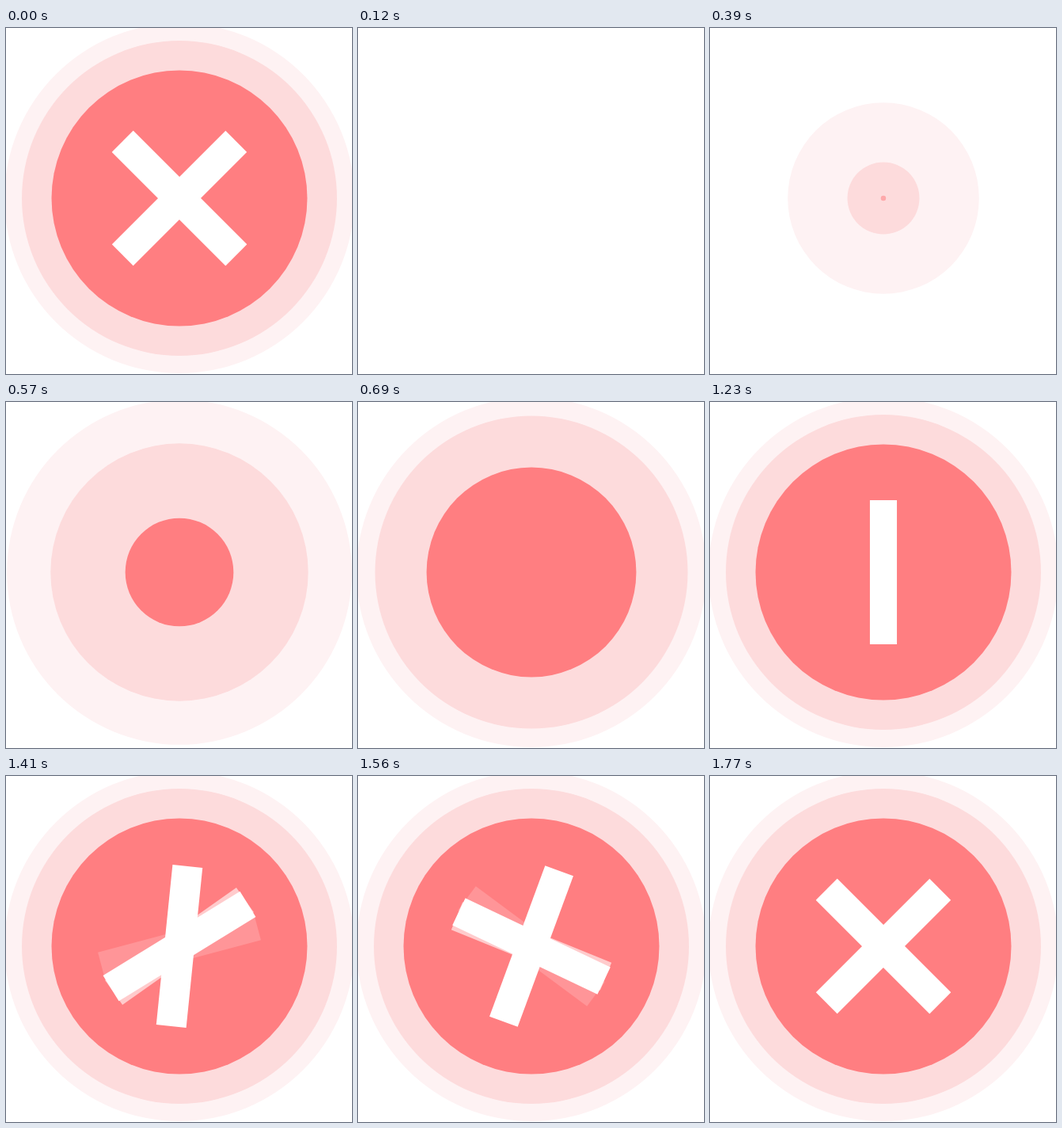
Recreate the animation shown at these times as an HTML page with a canvas. Size 437 by 437 pixels, loop 2250 ms.

```html
<!DOCTYPE html>
<html lang="en">
<head>
<meta charset="utf-8">
<title>Error badge</title>
<style>
  html, body { margin: 0; width: 100%; height: 100%; overflow: hidden; background: #fff; }
  canvas { display: block; }
</style>
</head>
<body>
<canvas id="stage" width="437" height="437"></canvas>
<script>
const ctx = document.getElementById('stage').getContext('2d');
const LOOP = 2250, STEP = 30, HOLD = 120;

const progress = (time, start, length) => Math.min(1, Math.max(0, (time - start) / length));
const inOutQuad = t => t < .5 ? 2 * t * t : 1 - 2 * (1 - t) ** 2;
const smooth = t => t * t * (3 - 2 * t);
const easeOut = power => t => 1 - (1 - t) ** power;

const discs = [
  { color: '#fef2f3', radius: 221, start: 149, length: 460 },
  { color: '#fddbdc', radius: 199, start: 221, length: 500 },
  { color: '#ff7e81', radius: 161.5, start: 340, length: 500 }
];

// Faint trails first, then the two solid arms of the cross.
const arms = [
  { alpha: .18, angle: 135, ease: easeOut(3.64) },
  { alpha: .6, angle: 135, ease: easeOut(2.33) },
  { alpha: 1, angle: 135, ease: easeOut(2.54) },
  { alpha: 1, angle: 45, ease: t => t ** 1.27 }
];

function drawDisc({ color, radius, start, length }, time) {
  const t = progress(time, start, length);
  ctx.globalAlpha = Math.min(1, t * 5.5);
  ctx.fillStyle = color;
  ctx.beginPath();
  ctx.arc(0, 0, radius * inOutQuad(t), 0, Math.PI * 2);
  ctx.fill();
}

function drawArm({ alpha, angle, ease }, scale, turn) {
  ctx.save();
  ctx.rotate(angle * ease(turn) * Math.PI / 180);
  ctx.scale(scale, scale);
  ctx.globalAlpha = alpha;
  ctx.fillStyle = '#fff';
  ctx.fillRect(-19, -101.5, 38, 203);
  ctx.restore();
}

function draw(now) {
  let time = Math.floor(now % LOOP / STEP) * STEP;
  if (time < HOLD) time += LOOP; // the finished badge opens the loop

  ctx.setTransform(1, 0, 0, 1, 0, 0);
  ctx.globalAlpha = 1;
  ctx.clearRect(0, 0, 437, 437);
  ctx.translate(219, 215);

  discs.forEach(disc => drawDisc(disc, time));
  const scale = smooth(progress(time, 870, 450));
  const turn = progress(time, 1320, 450);
  if (scale > 0) arms.forEach(arm => drawArm(arm, scale, turn));
}

const begin = performance.now();
function tick() {
  draw(performance.now() - begin);
  requestAnimationFrame(tick);
}
tick();
</script>
</body>
</html>
```
